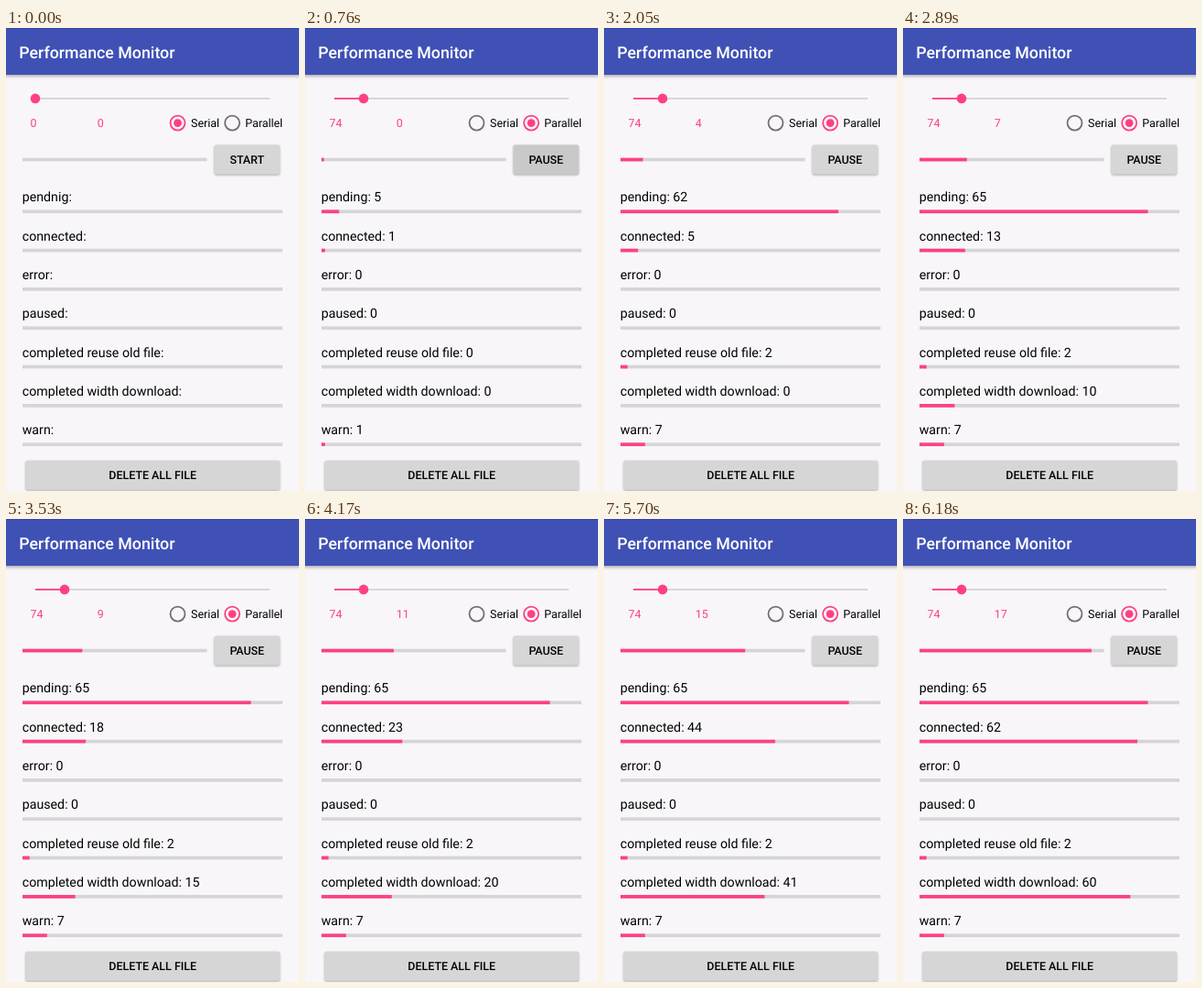
Write an HTML page that moves like this. It is 320 px wide and 505 px high and loops after 6210 ms.

```html
<!DOCTYPE html>
<html lang="en">
<head>
<meta charset="utf-8">
<title>Performance Monitor</title>
<style>
  html, body { margin: 0; width: 100%; height: 100%; overflow: hidden; background: #f8f6f9; }
  svg { display: block; width: 320px; height: 505px; }
  text { font: 12.44px Roboto, sans-serif; fill: #000; white-space: pre; text-rendering: geometricPrecision; }
  .title { font-size: 17.78px; font-weight: 500; fill: #fff; }
  .label { font-size: 14.22px; }
  .button { font-weight: 500; text-anchor: middle; }
  .pink { fill: #ff4081; }
  .track { fill: #d5d4d7; }
  .face { fill: #d6d6d7; filter: drop-shadow(0 1px 1.2px rgba(0, 0, 0, .32)); }
  .bar { fill: #3f51b5; filter: drop-shadow(0 1.5px 2px rgba(0, 0, 0, .4)); }
  .edge { fill: #303f9f; }
  .ring { fill: none; stroke-width: 1.8; }
</style>
</head>
<body>
<svg viewBox="0 0 320 505">
  <rect class="bar" x="-8" y="-8" width="336" height="59"/>
  <rect class="edge" width="320" height="0.8"/>
  <text class="title" x="14.2" y="33.3">Performance Monitor</text>

  <rect class="track" x="32" y="76" width="256" height="1.8"/>
  <rect id="slide" class="pink" x="32" y="76" height="1.8"/>
  <circle id="thumb" class="pink" cy="76.9" r="5.3"/>
  <text id="count" class="pink" x="26.6" y="108.4"></text>
  <text id="time" class="pink" x="99.8" y="108.4"></text>

  <g id="serial"><circle class="ring" cx="187.5" cy="103.6" r="8"/><circle class="pink" cx="187.5" cy="103.6"/></g>
  <text x="202" y="108.4">Serial</text>
  <g id="parallel"><circle class="ring" cx="247.1" cy="103.6" r="8"/><circle class="pink" cx="247.1" cy="103.6"/></g>
  <text x="261.2" y="108.4">Parallel</text>

  <rect class="track" x="18" y="141.7" width="201.5" height="3.7"/>
  <rect id="total" class="pink" x="18" y="141.7" height="3.7"/>

  <rect class="face" x="227.6" y="127.4" width="71.4" height="32" rx="1.8"/>
  <rect id="press" x="227.6" y="127.4" width="71.4" height="32" rx="1.8"/>
  <text id="action" class="button" x="263.3" y="148.3"></text>

  <g id="rows"></g>

  <rect class="face" x="21.5" y="471.8" width="277.5" height="32" rx="1.8"/>
  <text class="button" x="160.2" y="492.4">DELETE ALL FILE</text>
</svg>
<script>
const LOOP = 6210, TASKS = 74, START = 655, FIRST_DONE = 2050;
const names = ['pending', 'connected', 'error', 'paused',
  'completed reuse old file', 'completed width download', 'warn'];

const $ = id => document.getElementById(id);
const ramp = (t, from, to) => Math.min(1, Math.max(0, (t - from) / (to - from)));

// Downloads finished: a quick start, a steady rate, then a late rush.
function finishedAt(t) {
  const s = Math.max(0, t - FIRST_DONE) / 1000;
  return Math.round(3.45 * (1 - Math.exp(-s / 0.2)) + 7.8 * s + 24.3 * (s / 4.13) ** 8);
}

// Connections still open: up to five, fewer as files complete.
function openAt(t) {
  return Math.round(5 * ramp(t, START, 1500) - 2 * ramp(t, FIRST_DONE, 2700) - ramp(t, 5760, LOOP));
}

function secondsAt(t) {
  return Math.floor(4.21 * (Math.max(0, t - 1000) / 1000) ** 0.85);
}

function countsAt(t) {
  const done = finishedAt(t);
  const pending = Math.round(65 * ramp(t, START, 2117));
  const reused = Math.round(2 * ramp(t, 1330, 2000));
  const warned = Math.round(7 * ramp(t, START, 1850));
  return [pending, done + openAt(t), 0, 0, reused, done, warned];
}

$('rows').innerHTML = names.map((_, i) => {
  const y = 42.33 * i;
  return `<text class="label" x="17.7" y="${189.2 + y}"></text>
    <rect class="track" x="18" y="${198.4 + y}" width="284" height="3.7"/>
    <rect class="pink" x="18" y="${198.4 + y}" height="3.7"/>`;
}).join('');
const labels = document.querySelectorAll('#rows text');
const fills = document.querySelectorAll('#rows .pink');

function setRadio(id, on) {
  const [ring, dot] = $(id).children;
  ring.setAttribute('stroke', on > 0.5 ? '#ff4081' : '#717072');
  dot.setAttribute('r', 4.4 * on);
}

function draw(t) {
  const running = t >= START;
  const slide = ramp(t, 200, 320);
  $('slide').setAttribute('width', 32 * slide);
  $('thumb').setAttribute('cx', 32 + 32 * slide);
  $('count').textContent = Math.round(TASKS * slide);
  $('time').textContent = secondsAt(t);

  const pick = ramp(t, 340, 440);
  setRadio('serial', 1 - pick);
  setRadio('parallel', pick);

  $('press').setAttribute('opacity', running ? 0.13 * (1 - ramp(t, START, START + 200)) : 0);
  $('action').textContent = running ? 'PAUSE' : 'START';

  const counts = countsAt(t);
  names.forEach((name, i) => {
    labels[i].textContent = running ? `${name}: ${counts[i]}` : `${i ? name : 'pendnig'}:`;
    fills[i].setAttribute('width', 284 * counts[i] / TASKS);
  });
  const [reused, done, warned] = counts.slice(4);
  $('total').setAttribute('width', 201.5 * (reused + done + warned) / TASKS);
}

function frame() {
  draw(performance.now() % LOOP);
  requestAnimationFrame(frame);
}
frame();
</script>
</body>
</html>
```
